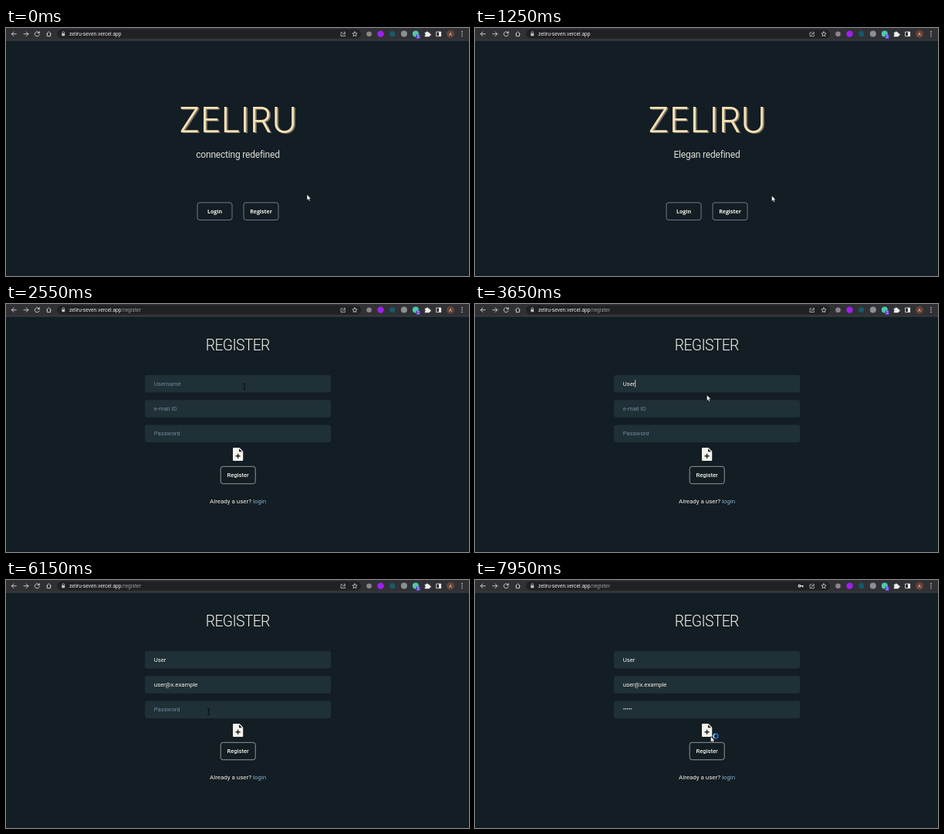
An HTML page for the animation above (8 s loop, 600x321 px).

```html
<!DOCTYPE html>
<html lang="en">
<head>
<meta charset="utf-8">
<title>Sign-up walkthrough</title>
<style>
  html, body { margin: 0; width: 100%; height: 100%; overflow: hidden; background: #131d24; }
  svg { display: block; width: 100%; height: 100%; }
  text { font-family: Roboto, sans-serif; fill: #f3f1e4; }
  .mid { text-anchor: middle; }
  .logo { font: 300 45px Inter, sans-serif; }
  .tagline { font-size: 12px; letter-spacing: -.2px; fill: #dedfd6; }
  .heading { font-size: 19.4px; font-weight: 300; letter-spacing: -.65px; }
  .home-label { font: 700 7px "Open Sans", sans-serif; }
  .form-label { font-size: 7.6px; font-weight: 500; }
  .field { font-size: 7.7px; }
  .url { font-size: 6.7px; fill: #e6e7e9; }
  .button { fill: none; stroke: #b9bebd; stroke-width: .75; }
  #home .button { stroke: #8f989b; }
  #home .button.hover { stroke: #a5d5e5; }
  .line { fill: none; stroke: #d4d6d9; stroke-width: .9; stroke-linecap: round; stroke-linejoin: round; }
</style>
</head>
<body>
<svg viewBox="0 0 600 321">
  <rect width="600" height="321" fill="#131d24"/>

  <g id="toolbar">
    <rect width="600" height="16" fill="#303135"/>
    <rect y="15.6" width="600" height=".8" fill="#484a4e"/>
    <rect x="66" y="1.8" width="394" height="11.8" rx="5.9" fill="#202124"/>
    <g class="line">
      <path d="M13.2 7.7H7.4M10 5 7.3 7.7 10 10.4"/>
      <path d="M23 7.7h5.8M26.2 5l2.7 2.7-2.7 2.7"/>
      <path d="M43 6.2A3 3 0 1 0 43.3 8.6M43.3 4.6V6.6H41.3"/>
      <path d="M52.6 7.6 55.5 4.8 58.4 7.6M53.4 7.2V10.6H57.6V7.2"/>
      <path stroke-width=".7" d="M73 7V6a1.3 1.3 0 0 1 2.6 0V7"/>
      <path stroke-width=".7" d="M436.2 5.8H434V10.6H439.4V9M436 8.8Q436.4 6.5 439.6 6.4M438.3 4.8 440 6.4 438.3 8"/>
      <path stroke-width=".8" d="M452 4.7l.95 2 2.2.25-1.65 1.5.45 2.2-1.95-1.1-1.95 1.1.45-2.2-1.65-1.5 2.2-.25Z"/>
      <path d="M558 5h5.6v5.6H558Z"/>
    </g>
    <rect x="72.4" y="7" width="3.8" height="3.2" rx=".5" fill="#c4c6c9"/>
    <rect x="561" y="5" width="2.8" height="5.6" fill="#eee"/>
    <circle cx="470.5" cy="7.7" r="3.3" fill="#8d8587"/>
    <circle cx="485.5" cy="7.6" r="4.2" fill="#a020f0"/>
    <circle cx="500.7" cy="7.6" r="3.6" fill="#18586c"/>
    <circle cx="515.8" cy="7.6" r="4" fill="#8d9092"/>
    <circle cx="530.8" cy="7.4" r="4" fill="#4cc9b0"/>
    <rect x="531.5" y="8.4" width="5.4" height="5.6" rx="1" fill="#5b3fd0"/>
    <text class="mid" x="534.2" y="13" style="font-size:5px">2</text>
    <path fill="#f1f1f1" d="M542.8 5.7h1.7a1.3 1.3 0 1 1 2.6 0h1.7v1.7a1.3 1.3 0 1 1 0 2.4v1.4h-6V9.6a1.3 1.3 0 0 0 0-2.4Z"/>
    <circle cx="576" cy="7.8" r="5" fill="#6a4136"/>
    <text class="mid" x="576" y="9.9" style="font-size:5.8px">A</text>
    <g fill="#d4d6d9"><circle cx="591" cy="4.9" r=".8"/><circle cx="591" cy="7.7" r=".8"/><circle cx="591" cy="10.5" r=".8"/></g>
    <g id="key" fill="none" stroke="#e2e3e5" stroke-width="1.2">
      <circle cx="420.5" cy="7.7" r="1.4"/><path d="M422 7.7h3.6M424.6 7.7v1.8"/>
    </g>
    <text class="url" x="82" y="10">zeliru-seven.vercel.app<tspan id="path" fill="#9a9da1">/register</tspan></text>
  </g>

  <g id="home">
    <text class="logo mid" x="302.3" y="136.4" style="fill:#766d5e">ZELIRU</text>
    <text class="logo mid" x="300.5" y="134.8" style="fill:#f5e1b6">ZELIRU</text>
    <text id="tagline" class="tagline mid" x="300.5" y="168.4"></text>
    <rect class="button" x="248" y="226" width="45" height="22.5" rx="3"/>
    <text class="home-label mid" x="270.5" y="240.1">Login</text>
    <rect id="glow" x="307.3" y="225.3" width="46.4" height="23.9" rx="3.6" fill="none" stroke="#5fa9c4" stroke-opacity=".5" stroke-width="2.4"/>
    <rect id="registerButton" class="button" x="308" y="226" width="45" height="22.5" rx="3"/>
    <text class="home-label mid" x="330.5" y="240.1">Register</text>
  </g>

  <g id="form">
    <text class="heading mid" x="300.3" y="60">REGISTER</text>
    <g id="fields"></g>
    <path fill="#f5f3ea" d="M295 186h7.6l4.6 4.7V202a1 1 0 0 1-1 1H295a1 1 0 0 1-1-1V187a1 1 0 0 1 1-1Z"/>
    <path fill="#131d24" d="M302 187.2v4h4Z"/>
    <path stroke="#131d24" stroke-width="1.4" d="M300.6 193.7v6M297.6 196.7h6"/>
    <rect class="button" x="278.2" y="210.3" width="45" height="22.4" rx="3"/>
    <text class="form-label mid" x="300.6" y="223.9">Register</text>
    <text class="mid" x="300.6" y="258.4" style="font-size:7.95px">Already a user? <tspan fill="#80b2cb">login</tspan></text>
    <rect id="caret" width=".8" height="9.5" fill="#f3f1e4"/>
  </g>

  <g id="pointer">
    <path id="arrow" fill="#fff" stroke="#111" stroke-width=".5" d="M0 0V7.4L1.7 5.9 2.9 8.6 4.2 8 3 5.4H5.3Z"/>
    <path id="hand" fill="#fff" stroke="#111" stroke-width=".5" d="M-.8 .6a.8.8 0 0 1 1.6 0V3.4L3.6 4Q4.4 4.3 4.3 5.2L3.6 8.8H-.4L-2.8 5.6Q-2.7 4.4-.8 5.6Z"/>
    <path id="beam" fill="none" stroke="#05090b" stroke-width=".9" d="M-1.8-4Q0-4 0-3Q0-4 1.8-4M0-3V3M-1.8 4Q0 4 0 3Q0 4 1.8 4"/>
    <g id="spinner" transform="translate(6.4 -.4)">
      <circle r="2.9" fill="none" stroke="#1d6fc0" stroke-width="1.7"/>
      <circle id="spark" r="2.9" fill="none" stroke="#7fe3f5" stroke-width="1.5" stroke-dasharray="6 12.22"/>
    </g>
  </g>
</svg>
<script>
const LOOP = 8000;
const PAGE_SWITCH = 2100;
const LOADING = 7600;
const $ = id => document.getElementById(id);
const show = (el, on) => el.setAttribute('display', on ? 'inline' : 'none');

// Each key press has its own time; the text length is the number of presses so far.
const fields = [
  { label: 'Username', y: 92, value: 'User', keys: [3150, 3250, 3350, 3500], focus: [2750, 3800] },
  { label: 'e-mail ID', y: 124.2, value: 'user@x.example', focus: [3850, 6050],
    keys: [3900, 4000, 4150, 4300, 4950, 5150, 5300, 5450, 5500, 5600, 5650, 5700, 5800, 5850] },
  { label: 'Password', y: 156.4, value: '', keys: [6650, 6850, 6900, 7050, 7150], focus: [6250, 7450] }
];

function add(name, attrs, parent) {
  const el = document.createElementNS('http://www.w3.org/2000/svg', name);
  for (const key in attrs) el.setAttribute(key, attrs[key]);
  return parent.appendChild(el);
}

for (const field of fields) {
  add('rect', { x: 180, y: field.y, width: 241, height: 22.5, rx: 3, fill: '#203037' }, $('fields'));
  field.text = add('text', { class: 'field', x: 191.7, y: field.y + 13.8 }, $('fields'));
  field.dots = field.value ? [] : field.keys.map((_, i) =>
    add('circle', { cx: 193 + 2.35 * i, cy: field.y + 10.4, r: .8, fill: '#f3f1e4' }, $('fields')));
}

const route = [
  [0, 390, 215.5], [900, 390, 215.5], [1250, 384.5, 217], [1700, 335, 240],
  [2350, 335, 240], [2550, 309, 107], [3550, 309, 107], [3800, 285, 137],
  [6030, 285, 137], [6150, 262.5, 170.5], [7380, 262.5, 170.5], [7650, 305.5, 202.5], [LOOP, 305.5, 202.5]
];

function pointerAt(t) {
  const i = route.findIndex(stop => stop[0] > t);
  const [t0, x0, y0] = route[i - 1], [t1, x1, y1] = route[i];
  const p = (t - t0) / (t1 - t0), ease = p * p * (3 - 2 * p);
  return [x0 + (x1 - x0) * ease, y0 + (y1 - y0) * ease];
}

function taglineAt(t) {
  const steps = (from, pace) => Math.max(0, Math.floor((t - from) / pace) + 1);
  if (t < 600) return 'connecting'.slice(0, Math.max(0, 10 - steps(50, 50)));
  const word = 'Elegance'.slice(0, steps(720, 100));
  return word.slice(0, Math.max(0, word.length - steps(1990, 60)));
}

function drawFields(t) {
  let caretOn = false;
  for (const { label, y, value, keys, focus, text, dots } of fields) {
    const typed = keys.filter(k => k <= t);
    const count = typed.length;
    text.textContent = count ? value.slice(0, count) : label;
    text.style.fill = count ? '#f3f1e4' : '#71899a';
    dots.forEach((dot, i) => show(dot, i < count));
    if (t < focus[0] || t >= focus[1]) continue;
    const since = t - Math.max(focus[0], ...typed);
    caretOn = since % 1000 < 500;
    const width = !count ? 0 : dots.length ? 2.35 * count : text.getComputedTextLength();
    $('caret').setAttribute('x', 191.7 + width);
    $('caret').setAttribute('y', y + 6.3);
  }
  show($('caret'), caretOn);
}

function drawPointer(t, onForm) {
  const [x, y] = pointerAt(t);
  const overButton = !onForm && x > 308 && x < 353 && y > 226 && y < 248.5;
  const overField = onForm && x < 421 && fields.some(f => y > f.y && y < f.y + 22.5);
  $('pointer').setAttribute('transform', `translate(${x} ${y})`);
  show($('hand'), overButton);
  show($('beam'), overField);
  show($('arrow'), !overButton && !overField);
  show($('spinner'), t >= LOADING);
  $('spark').setAttribute('transform', `rotate(${(t - LOADING) * .36})`);
  show($('glow'), overButton);
  $('registerButton').classList.toggle('hover', overButton);
}

function draw(t) {
  const onForm = t >= PAGE_SWITCH;
  show($('home'), !onForm);
  show($('form'), onForm);
  show($('path'), onForm);
  show($('key'), t >= 6650);
  if (onForm) drawFields(t);
  else $('tagline').textContent = `${taglineAt(t)} redefined`.trim();
  drawPointer(t, onForm);
}

const start = performance.now();
function tick() {
  draw((performance.now() - start) % LOOP);
  requestAnimationFrame(tick);
}
tick();
</script>
</body>
</html>
```
